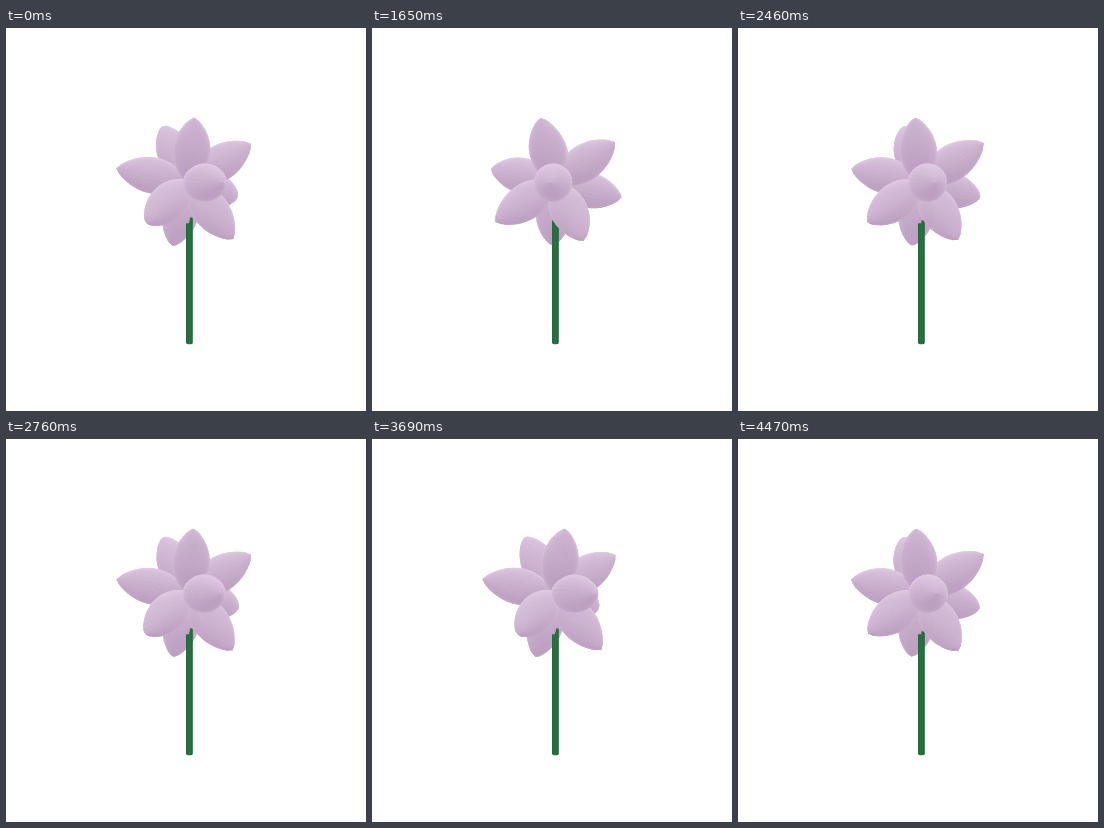
Animation of 360x383 px, one loop 4.5 s. Source, as an HTML page with a canvas:

```html
<!DOCTYPE html>
<html>
<head>
<meta charset="utf-8">
<title>Flower</title>
<style>
html, body { margin: 0; width: 100%; height: 100%; overflow: hidden; background: #fff; }
canvas { display: block; }
</style>
</head>
<body>
<canvas id="stage" width="360" height="383"></canvas>
<script>
const ctx = document.getElementById('stage').getContext('2d');
const LOOP = 4500, STEP = 30;
const CENTER = [183, 154.5], CAMERA = 750;
const LENGTH = 73, RADIUS = 17.7, RINGS = 22, SECTORS = 28;
const DARK = [186, 156, 190], LIGHT = [223, 202, 226];

// Petal directions: azimuth and elevation in degrees, the first faces the viewer
const PETALS = [[0, 0], [-17, 56], [36, -48], [-63, -31], [71, 32],
  [-111, 11], [111, -12], [187, -63], [195, 53]];

// The flower swings between these [time, angle] poses
const SWING = [[570, 24], [1890, -5], [3250, 34], [5400, -5]];

const rad = deg => deg * Math.PI / 180;
const mix = (a, b, u) => a + (b - a) * u;

function angleAt(t) {
  if (t <= SWING[0][0]) return SWING[0][1];
  const i = SWING.findIndex(pose => pose[0] > t);
  const [t0, a0] = SWING[i - 1], [t1, a1] = SWING[i];
  return mix(a0, a1, (1 - Math.cos(Math.PI * (t - t0) / (t1 - t0))) / 2);
}

const profile = s => RADIUS * Math.max(0, Math.sin(Math.PI * s)) ** .7;

function project([x, y, z]) {
  const k = CAMERA / (CAMERA - z);
  return [CENTER[0] + x * k, CENTER[1] + y * k];
}

function color([nx, ny, nz]) {
  const light = .4 - .45 * ny + .5 * (1 - nz) ** 3;
  const u = Math.min(1, Math.max(0, light));
  return `rgb(${DARK.map((c, i) => Math.round(mix(c, LIGHT[i], u)))})`;
}

// Visible faces of one spindle-shaped petal
function petalFaces(azimuth, elevation) {
  const a = rad(azimuth), e = rad(elevation);
  const axis = [Math.cos(e) * Math.sin(a), -Math.sin(e), Math.cos(e) * Math.cos(a)];
  const side = [Math.cos(a), 0, -Math.sin(a)];
  const up = [Math.sin(e) * Math.sin(a), Math.cos(e), Math.sin(e) * Math.cos(a)];
  const around = (phi, r, d) => axis.map((c, i) =>
    c * d + r * (side[i] * Math.cos(phi) + up[i] * Math.sin(phi)));
  const point = (i, j) => around(2 * Math.PI * j / SECTORS, profile(i / RINGS), LENGTH * i / RINGS);

  const faces = [];
  for (let i = 0; i < RINGS; i++) {
    const rise = (profile((i + 1) / RINGS) - profile(i / RINGS)) * RINGS / LENGTH;
    for (let j = 0; j < SECTORS; j++) {
      const normal = around(2 * Math.PI * (j + .5) / SECTORS, 1, -rise)
        .map(c => c / Math.hypot(1, rise));
      if (normal[2] < 0) continue;
      const corners = [point(i, j), point(i + 1, j), point(i + 1, j + 1), point(i, j + 1)];
      faces.push({
        z: corners.reduce((sum, c) => sum + c[2], 0) / 4,
        points: corners.map(project),
        color: color(normal)
      });
    }
  }
  return faces;
}

function drawFace({ points, color }) {
  ctx.fillStyle = ctx.strokeStyle = color;
  ctx.beginPath();
  for (const p of points) ctx.lineTo(...p);
  ctx.closePath();
  ctx.fill();
  ctx.stroke();
}

function drawStem() {
  const shade = ctx.createLinearGradient(180, 0, 187, 0);
  ['#2a6540', '#297240', '#1f6737'].forEach((c, i) => shade.addColorStop(i / 2, c));
  ctx.fillStyle = shade;
  ctx.beginPath();
  ctx.roundRect(180, 189, 6.8, 127.3, [5, 2, 2, 2]);
  ctx.fill();
}

function draw(t) {
  const turn = angleAt(t);
  const faces = PETALS.flatMap(([a, e]) => petalFaces(a + turn, e)).sort((p, q) => p.z - q.z);
  ctx.clearRect(0, 0, 360, 383);
  ctx.lineWidth = .7;
  ctx.lineJoin = 'round';
  faces.filter(f => f.z < 0).forEach(drawFace);
  drawStem();
  faces.filter(f => f.z >= 0).forEach(drawFace);
}

const start = performance.now();
let shown = -1;
function frame() {
  const t = Math.floor((performance.now() - start) % LOOP / STEP) * STEP;
  if (t !== shown) draw(shown = t);
  requestAnimationFrame(frame);
}
frame();
</script>
</body>
</html>
```
